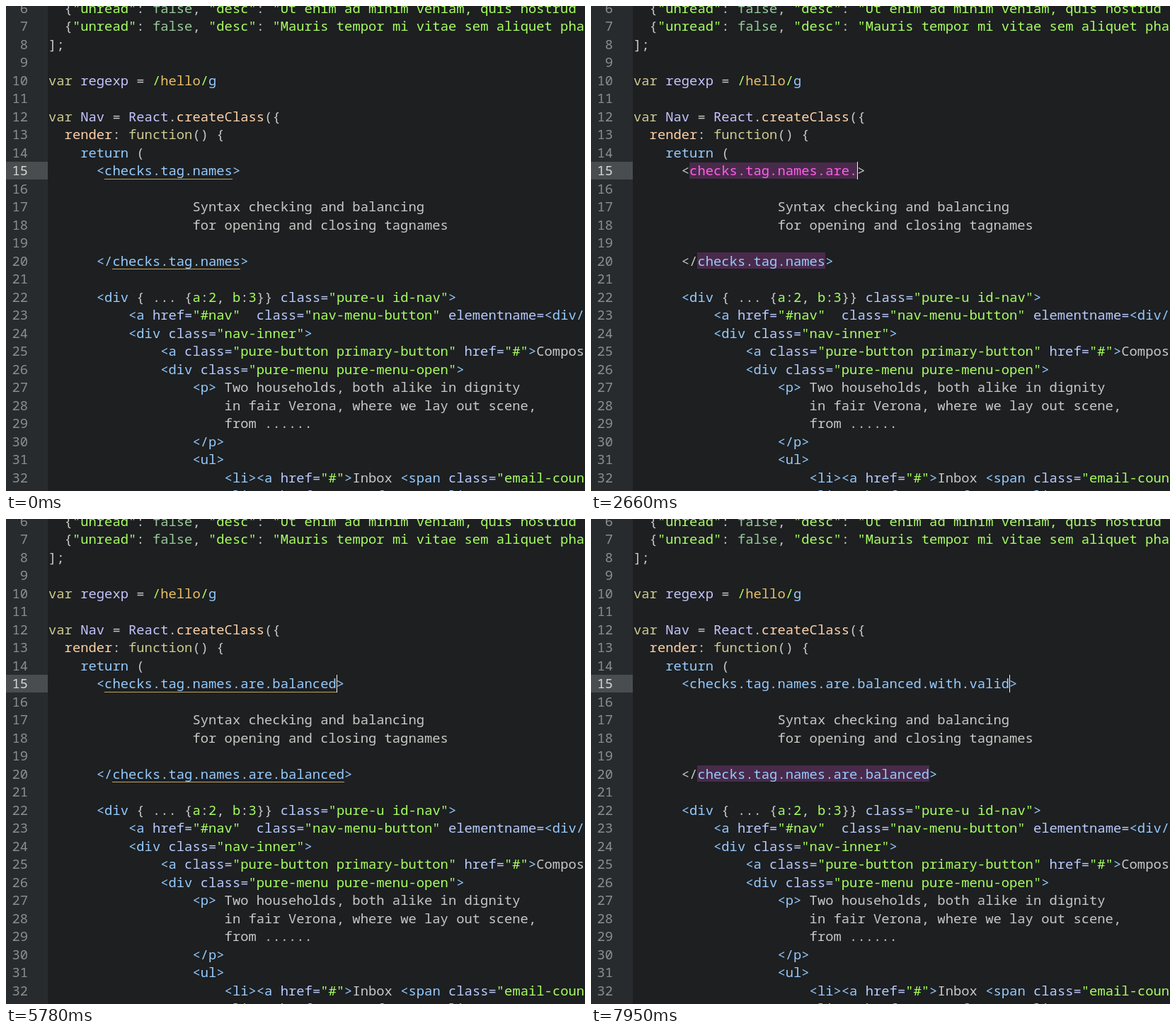
An HTML page for the animation above (8 s loop, 818 by 685 pixels).

```html
<!DOCTYPE html>
<html lang="en">
<head>
<meta charset="utf-8">
<title>Tag balancing</title>
<style>
  html, body { margin: 0; width: 100%; height: 100%; overflow: hidden; background: #1d1f21; }
  svg { display: block; width: 818px; height: 685px; }
  text { font: 18.833px "Noto Sans Mono", "DejaVu Sans Mono", monospace; white-space: pre; }
  .w { fill: #c8c9c5; }
  .k { fill: #cfcb90; }
  .v { fill: #c6c5fe; }
  .a { fill: #b9cbff; }
  .f { fill: #ffd2a7; }
  .s { fill: #a8ff60; }
  .c { fill: #99cc99; }
  .b { fill: #96cbfe; }
  .r { fill: #e9c062; }
  .m { fill: #ff60e8; }
  .num { fill: #8b8e90; text-anchor: end; }
  .num.on { fill: #d6d8d6; }
  .mark { fill: #492a4b; }
  .line { fill: #c4a45c; }
  .caret { fill: #f4f4f0; }
</style>
</head>
<body>
<svg viewBox="0 0 818 685">
  <rect width="59" height="685" fill="#282b2e"/>
  <rect id="active" width="59" height="25" fill="#4a4d50"/>
  <g id="code"></g>
  <g id="tags"></g>
</svg>
<script>
const CHAR = 11.3, ROW = 25.5, FIRST = 6, LOOP = 8000;
const OPEN_ROW = 15, CLOSE_ROW = 20;

// "~x" switches to colour class x
const code = `  ~w{~s"unread"~w: ~cfalse~w, ~s"desc"~w: ~s"Ut enim ad minim veniam, quis nostrud exer
  ~w{~s"unread"~w: ~cfalse~w, ~s"desc"~w: ~s"Mauris tempor mi vitae sem aliquet pharetra
~w];

~kvar ~vregexp ~w= ~s/~rhello~s/~bg

~kvar ~vNav ~w= ~vReact~w.~fcreateClass~w({
  ~frender~w: ~kfunction~w() {
    ~breturn ~w(


                  ~wSyntax checking and balancing
                  ~wfor opening and closing tagnames



      ~b<div ~w{ ... {~sa~w:~s2~w, ~sb~w:~s3~w}} ~aclass=~s"pure-u id-nav"~b>
          ~b<a ~ahref=~s"#nav"  ~aclass=~s"nav-menu-button" ~aelementname=~b<div/>
          ~b<div ~aclass=~s"nav-inner"~b>
              ~b<a ~aclass=~s"pure-button primary-button" ~ahref=~s"#"~b>~wCompose
              ~b<div ~aclass=~s"pure-menu pure-menu-open"~b>
                  ~b<p> ~wTwo households, both alike in dignity
                      ~win fair Verona, where we lay out scene,
                      ~wfrom ......
                  ~b</p>
                  ~b<ul>
                      ~b<li><a ~ahref=~s"#"~b>~wInbox ~b<span ~aclass=~s"email-count"~b>
                      ~b<li><a ~ahref=~s"#"~b>~wDrafts~b</a></li>`;

// time, text added to the opening tag, text added to the closing tag, caret row (0: hidden)
const FULL = '.are.balanced';
const steps = [
  [0, '', '', 0], [250, '', '', 15], [530, '', '', 0], [990, '', '', 15], [1270, '', '', 0],
  [1390, '.', '', 15], [2070, '.a', '', 15], [2350, '.are', '', 15], [2660, '.are.', '', 15],
  [3060, '.are.bala', '', 15], [3180, '.are.balan', '', 15],
  [3430, FULL, '', 20], [3860, FULL, '.a', 20], [4260, FULL, '.are', 20], [4540, FULL, '.are.', 20],
  [4810, FULL, '.are.bala', 20], [5060, FULL, '.are.balan', 20],
  [5780, FULL, FULL, 15], [6180, FULL + '.', FULL, 15],
  [6860, FULL + '.wi', FULL, 15], [6980, FULL + '.with', FULL, 15],
  [7410, FULL + '.with.', FULL, 15], [7830, FULL + '.with.va', FULL, 15],
  [7950, FULL + '.with.valid', FULL, 15]
];

const $ = id => document.getElementById(id);
const rowTop = n => 220 + ROW * (n - OPEN_ROW);
const baseline = n => Math.round(rowTop(n) + 19);
const colX = c => Math.floor(60.4 + c * CHAR);

function add(parent, tag, attrs, text) {
  const el = document.createElementNS('http://www.w3.org/2000/svg', tag);
  for (const name in attrs) el.setAttribute(name, attrs[name]);
  if (text !== undefined) el.textContent = text;
  parent.appendChild(el);
  return el;
}

function drawLine(parent, n, str) {
  const [indent, ...parts] = str.split('~');
  const el = add(parent, 'text', { x: 60 + indent.length * CHAR, y: baseline(n) });
  parts.forEach(p => add(el, 'tspan', { class: p[0] }, p.slice(1)));
}

function drawBar(cls, n, from, to, dy, h) {
  add($('tags'), 'rect', {
    class: cls, x: colX(from), y: Math.floor(rowTop(n)) + dy,
    width: Math.max(1, colX(to) - colX(from)), height: h
  });
}

const numbers = {};
code.split('\n').forEach((str, i) => {
  const n = FIRST + i;
  numbers[n] = add($('code'), 'text', { class: 'num', x: 31, y: baseline(n) }, n);
  if (str) drawLine($('code'), n, str);
});

function drawTags([, openTail, closeTail, caretRow]) {
  const open = 'checks.tag.names' + openTail, close = 'checks.tag.names' + closeTail;
  const matched = open === close, broken = open.endsWith('.');
  const openEnd = 7 + open.length, closeEnd = 8 + close.length;
  const row = caretRow || OPEN_ROW;

  $('tags').replaceChildren();
  $('active').setAttribute('y', Math.floor(rowTop(row)));
  numbers[OPEN_ROW].classList.toggle('on', row === OPEN_ROW);
  numbers[CLOSE_ROW].classList.toggle('on', row === CLOSE_ROW);

  if (broken) drawBar('mark', OPEN_ROW, 7, openEnd, 1, 23);
  if (!matched) drawBar('mark', CLOSE_ROW, 8, closeEnd, 1, 23);

  const edge = broken ? '~w' : '~b';
  drawLine($('tags'), OPEN_ROW, `      ${edge}<${broken ? '~m' : '~b'}${open}${edge}>`);
  drawLine($('tags'), CLOSE_ROW, `      ${matched ? '~b' : '~w'}</~b${close}>`);

  if (matched) {
    drawBar('line', OPEN_ROW, 7, openEnd, 24, 1);
    drawBar('line', CLOSE_ROW, 8, closeEnd, 24, 1);
  }
  if (caretRow) {
    const col = caretRow === OPEN_ROW ? openEnd : closeEnd;
    drawBar('caret', caretRow, col, col, 0, 25);
  }
}

const start = performance.now();
let shown;
function frame() {
  const t = Math.max(0, performance.now() - start) % LOOP;
  const step = steps.findLast(s => s[0] <= t);
  if (step !== shown) drawTags(shown = step);
  requestAnimationFrame(frame);
}
frame();
</script>
</body>
</html>
```
